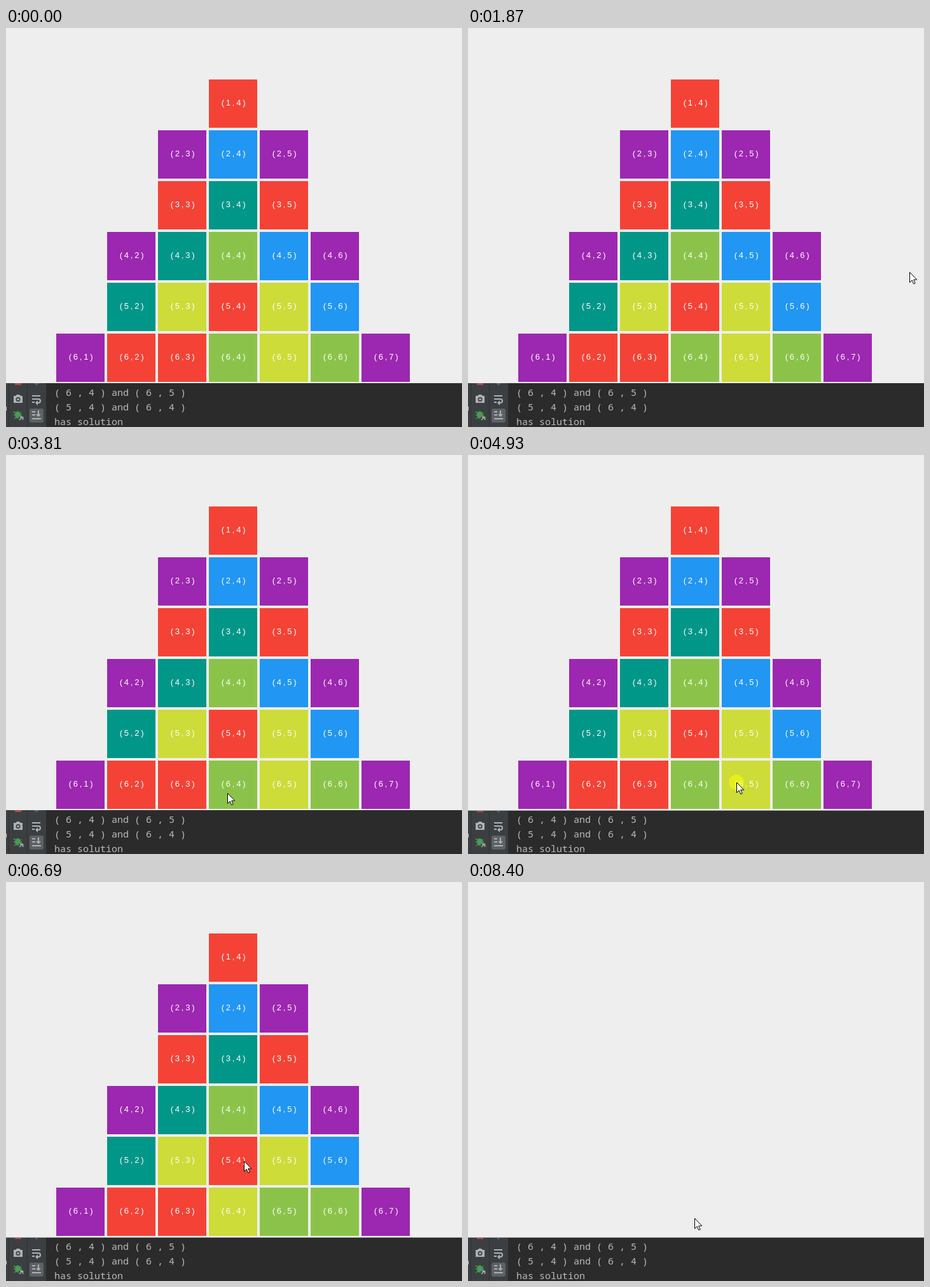
Recreate the animation shown at these times as an HTML page. Size 717 px wide and 628 px high, loop 9700 ms.

```html
<!DOCTYPE html>
<html lang="en">
<head>
<meta charset="utf-8">
<style>
  html, body { margin: 0; height: 100%; overflow: hidden; background: #eee; }
  svg { display: block; }
  .label { font: 13px "Liberation Sans", sans-serif; letter-spacing: 2.8px; fill: #fff; text-anchor: middle; }
  .log { font: 15px "Noto Sans Mono", monospace; fill: #bbb; white-space: pre; }
  .line { fill: none; stroke: #afb1b3; stroke-width: 2; }
</style>
</head>
<body>
<svg width="717" height="628" viewBox="0 0 717 628">
  <rect width="717" height="628" fill="#2b2b2b"/>
  <rect y="558" width="63" height="70" fill="#3c3f41"/>
  <path d="M4.5 558V628M33.5 558V628" stroke="#2f3133"/>
  <rect y="596" width="1" height="6" fill="#ccc"/>

  <rect x="14" y="558" width="10" height="4" fill="#b04a48"/>
  <path d="M44 559h8l-4 4z" fill="#5d6062"/>

  <!-- camera -->
  <path d="M12 579h3l2-2h4l2 2h3v11H12z" fill="#afb1b3"/>
  <circle cx="19" cy="584.5" r="3.5" fill="#3c3f41"/>
  <circle cx="19" cy="584.5" r="1.8" fill="#afb1b3"/>

  <!-- bug with arrow -->
  <g stroke="#499c54" stroke-width="1.5" fill="none">
    <ellipse cx="18.5" cy="609" rx="3.6" ry="5" fill="#499c54"/>
    <path d="M12 604l13 8M12 609h13M13 615l11-10"/>
  </g>
  <path d="M20 618v-6h8v6z" fill="#3c3f41"/>
  <path d="M21 617l5-5M22 612.5h4.5v4.5" stroke="#afb1b3" stroke-width="1.6" fill="none"/>

  <!-- soft wrap -->
  <path class="line" d="M41 579h13M41 584h10a3 3 0 0 1 0 6h-3M41 589h4"/>
  <path d="M50 586v8l-4-4z" fill="#afb1b3"/>

  <!-- scroll to end -->
  <rect x="37" y="599" width="22" height="22" rx="3" fill="#5c6164"/>
  <path class="line" d="M41 604h5M41 609h5M41 615h14M51 602v7"/>
  <path d="M47 608h8l-4 4z" fill="#afb1b3"/>

  <text class="log" x="76" y="579">( 6 , 4 ) and ( 6 , 5 )</text>
  <text class="log" x="76" y="602">( 5 , 4 ) and ( 6 , 4 )</text>
  <text class="log" x="76" y="625">has solution</text>

  <rect width="717" height="559" fill="#eee"/>
  <rect id="border" y="559" width="717" height="1" fill="#a5a5a5"/>
  <g id="tiles"></g>
  <circle id="click" r="12" fill="#ff0" fill-opacity=".5"/>
  <g id="cursor">
    <path id="arrow" d="M.5 .5V16.5L4.2 13L6.8 18.8L9.2 17.7L6.7 12.1H11.8Z" fill="#fff" stroke="#000"/>
    <path id="beam" d="M-3 -8.5H3M0 -8V8M-3 8.5H3" fill="none" stroke="#161616"/>
  </g>
</svg>
<script>
const LOOP = 9700, STEP = 50;
const SWAP = 5030, CLEAR = 8400;
const $ = id => document.getElementById(id);
const colors = {
  r: '#f44336', p: '#9c27b0', b: '#2196f3',
  t: '#009688', g: '#8bc34a', l: '#cddc39'
};
const rows = ['   r   ', '  pbp  ', '  rtr  ', ' ptgbp ', ' tlrlb ', 'prrglgp'];

function add(tag, attrs, text = '') {
  const el = document.createElementNS('http://www.w3.org/2000/svg', tag);
  for (const k in attrs) el.setAttribute(k, attrs[k]);
  el.textContent = text;
  return $('tiles').appendChild(el);
}

const tiles = {};
rows.forEach((row, r) => [...row].forEach((key, c) => {
  if (key === ' ') return;
  const x = 79 + 80 * c, y = 81 + 80 * r, name = `(${r + 1},${c + 1})`;
  tiles[name] = add('rect', { x, y, width: 76, height: 76, fill: colors[key] });
  add('text', { x: x + 40, y: y + 41, class: 'label' }, name);
}));

// pointer moves: start, end, x, y; it rests in between
const moves = [
  [1130, 1510, 692, 327],
  [1510, 1860, 694, 384],
  [1860, 2020, 622, 588],
  [2250, 2660, 122, 579],
  [2840, 3170, 244, 579],
  [3550, 3810, 348, 532],
  [3810, 4600, 422, 515],
  [5390, 5720, 354, 601],
  [6050, 6660, 374, 439],
  [7430, 7710, 356, 529]
];

const ease = u => u * u * (3 - 2 * u);

function pointer(t) {
  let x = 684, y = 588;
  for (const [from, to, toX, toY] of moves) {
    const s = ease(Math.min(1, Math.max(0, (t - from) / (to - from))));
    x += (toX - x) * s;
    y += (toY - y) * s;
  }
  return [Math.round(x), Math.round(y)];
}

const within = (t, from, to) => t >= from && t < to;
const show = (id, on) => $(id).setAttribute('visibility', on ? 'visible' : 'hidden');
const place = (id, x, y) => $(id).setAttribute('transform', `translate(${x} ${y})`);

function draw(t) {
  // the pointer advances in steps
  const [x, y] = pointer(Math.floor((t - 10) / STEP) * STEP + 10);
  const seen = within(t, 1130, 2020) || t >= 2250;
  const overLog = y > 559;
  const swapped = t >= SWAP;

  tiles['(6,4)'].setAttribute('fill', swapped ? colors.l : colors.g);
  tiles['(6,5)'].setAttribute('fill', swapped ? colors.g : colors.l);
  show('tiles', t < CLEAR);
  show('border', t >= 4000);

  place('cursor', x, y);
  show('arrow', seen && !overLog);
  show('beam', seen && overLog);
  place('click', x, y);
  show('click', within(t, 4930, SWAP) || within(t, 7020, 7100) || within(t, 8250, CLEAR));
}

const start = performance.now();
function tick() {
  draw((performance.now() - start) % LOOP);
  requestAnimationFrame(tick);
}
tick();
</script>
</body>
</html>
```
